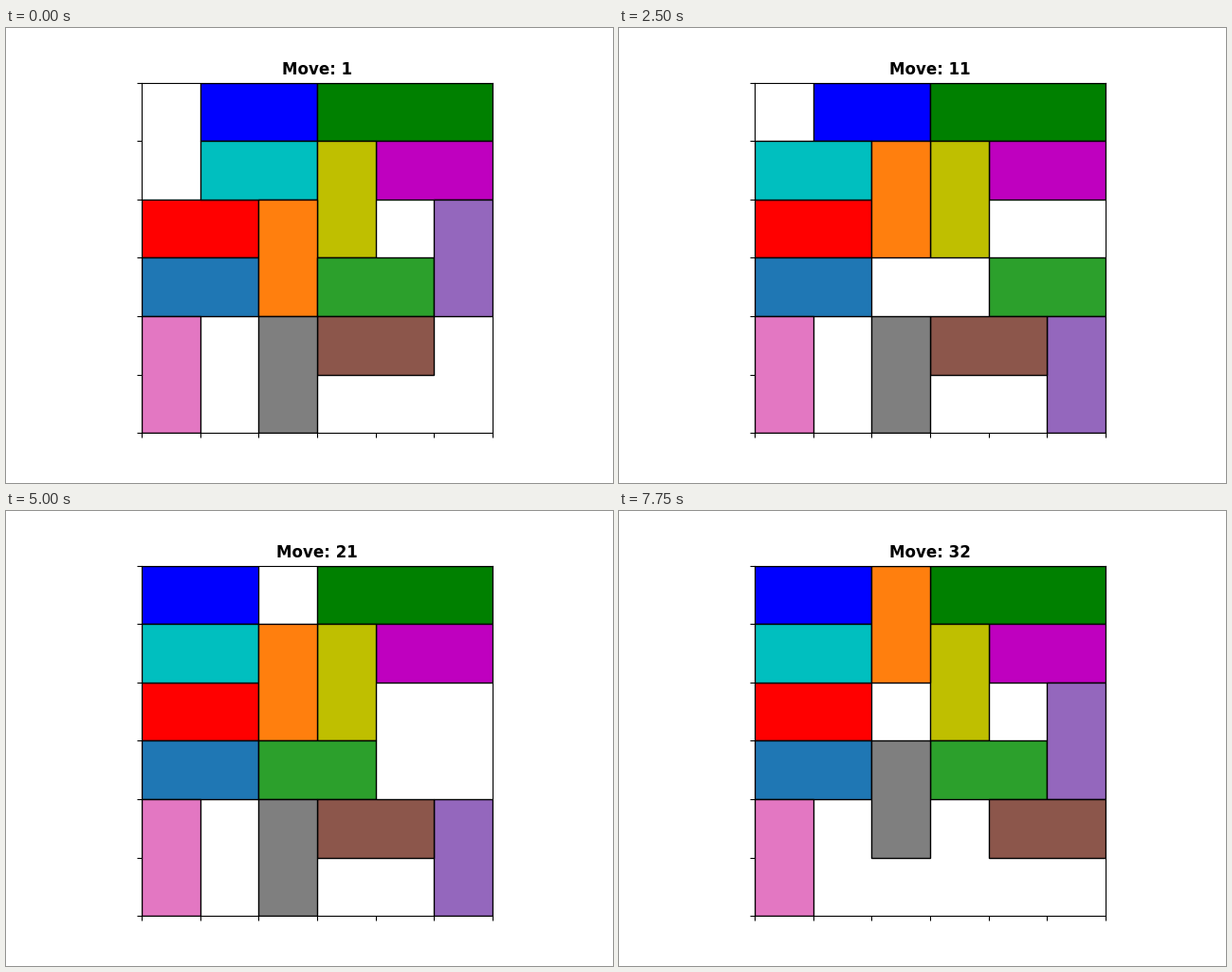
Recreate the animation shown at these times as a matplotlib script. Size 640 px wide and 480 px high, loop 8000 ms.

```python
import matplotlib.pyplot as plt
from matplotlib.animation import FuncAnimation
from matplotlib.patches import Rectangle

SIZE = 6

# name: (colour, column, row from the top, width, height)
CARS = {
    "red": ("red", 0, 2, 2, 1),
    "blue": ("b", 1, 0, 2, 1),
    "green": ("g", 3, 0, 3, 1),
    "cyan": ("c", 1, 1, 2, 1),
    "magenta": ("m", 4, 1, 2, 1),
    "yellow": ("y", 3, 1, 1, 2),
    "steel": ("tab:blue", 0, 3, 2, 1),
    "orange": ("tab:orange", 2, 2, 1, 2),
    "leaf": ("tab:green", 3, 3, 2, 1),
    "purple": ("tab:purple", 5, 2, 1, 2),
    "brown": ("tab:brown", 3, 4, 2, 1),
    "pink": ("tab:pink", 0, 4, 1, 2),
    "gray": ("tab:gray", 2, 4, 1, 2),
}

# Each car slides along its length; positive is right or down.
MOVES = [
    ("purple", 2), ("leaf", 1), ("yellow", 1), ("magenta", -1),
    ("cyan", -1), ("orange", -1), ("gray", -1), ("magenta", 1),
    ("yellow", -1), ("gray", 1), ("leaf", -1), ("purple", -1),
    ("gray", -1), ("purple", -1), ("brown", 1), ("gray", 1),
    ("leaf", -1), ("brown", -1), ("blue", -1), ("purple", 2),
    ("orange", -1), ("red", 1), ("purple", -1), ("leaf", 1),
    ("red", -1), ("gray", -1), ("purple", 1), ("red", 1),
    ("purple", -2), ("brown", 1), ("red", -1),
]

fig, ax = plt.subplots(figsize=(6.4, 4.8), dpi=100)
ax.set_xlim(0, SIZE)
ax.set_ylim(SIZE, 0)
ax.set_aspect("equal")
ax.set_xticks(range(SIZE + 1), labels=[])
ax.set_yticks(range(SIZE + 1), labels=[])
title = ax.set_title("", fontweight="bold")

blocks = {}
for name, (color, x, y, w, h) in CARS.items():
    blocks[name] = ax.add_patch(
        Rectangle((x, y), w, h, facecolor=color, edgecolor="black"))


def draw(i):
    shift = dict.fromkeys(CARS, 0)
    for name, step in MOVES[:i]:
        shift[name] += step
    for name, (_, x, y, w, h) in CARS.items():
        d = shift[name]
        blocks[name].set_xy((x + d, y) if w > h else (x, y + d))
    title.set_text(f"Move: {i + 1}")
    return [title, *blocks.values()]


anim = FuncAnimation(fig, draw, frames=len(MOVES) + 1, interval=250,
                     init_func=lambda: draw(0), repeat=True, repeat_delay=0)
plt.show()
```
